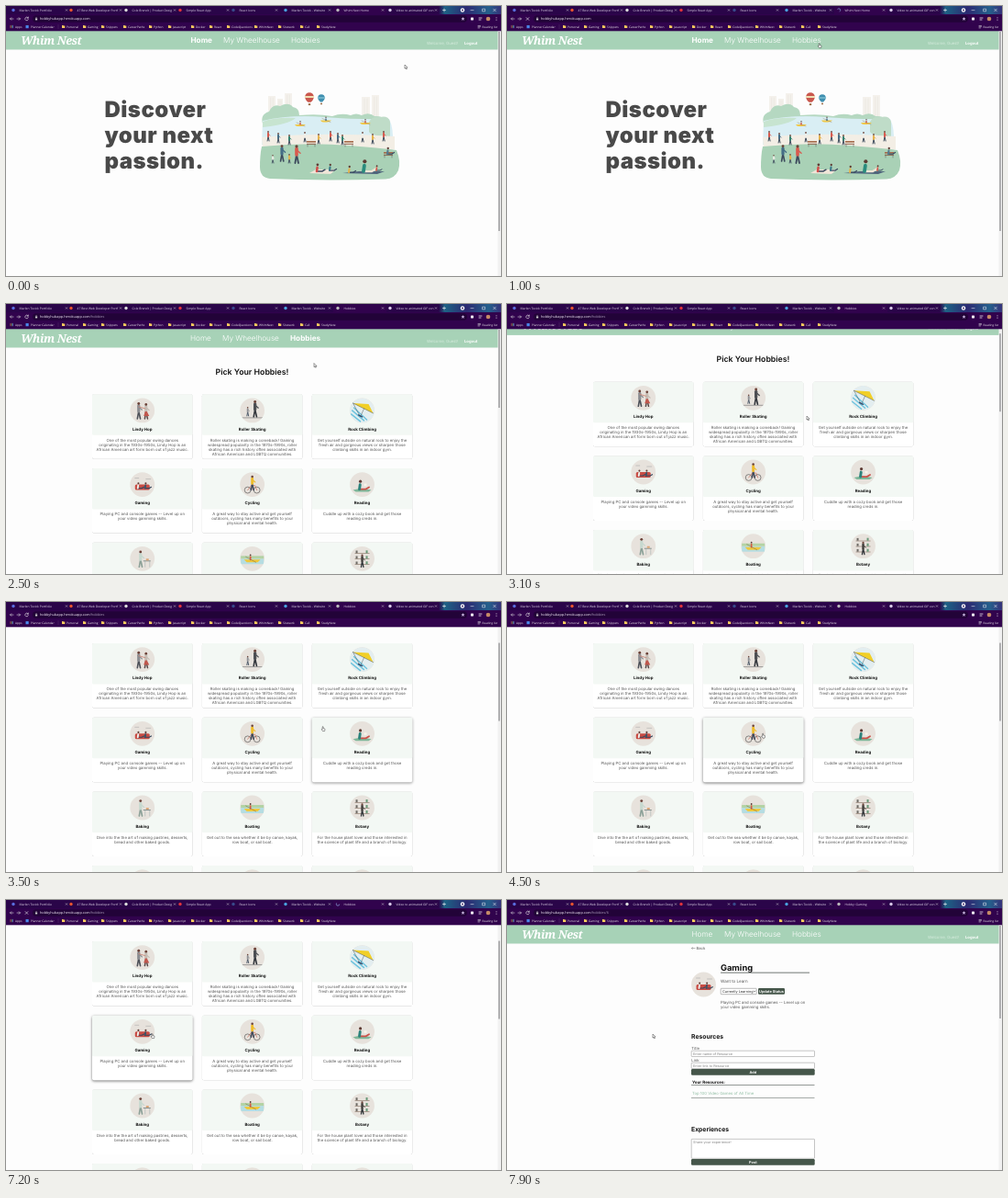
An HTML page for the animation above (8 s loop, 540 by 294 pixels).

```html
<!DOCTYPE html>
<html lang="en">
<head>
<meta charset="utf-8">
<title>Whim Nest</title>
<style>
html, body { margin: 0; width: 100%; height: 100%; overflow: hidden; background: #fdfdfd; }
svg { display: block; width: 540px; height: 294px; font-family: Inter, "Open Sans", sans-serif; text-rendering: geometricPrecision; }
.ui { font-family: "Open Sans", "Noto Sans", sans-serif; }
.logo { font-family: "Noto Serif", "Liberation Serif", serif; font-style: italic; }
.card { fill: #fff; filter: drop-shadow(0 .5px .6px rgba(0,0,0,.35)); }
.lift { fill: #fff; filter: drop-shadow(.5px 1.2px 1.4px rgba(0,0,0,.55)); }
</style>
</head>
<body>
<svg id="stage" viewBox="0 0 540 294"></svg>
<script>
const LOOP = 8000, STEP = 100;
const SHOW_HOBBIES = 1300, SHOW_DETAIL = 7500;
const INK = '#222', GREY = '#555', GREEN = '#a7d2b7', DARK = '#45564a';

// Drawing helpers
const text = (x, y, s, size, fill = INK, weight = 400, extra = '') =>
  `<text x="${x}" y="${y}" font-size="${size}" fill="${fill}" font-weight="${weight}" ${extra}>${s}</text>`;
const mid = (x, y, s, size, fill, weight) => text(x, y, s, size, fill, weight, 'text-anchor="middle"');
const rect = (x, y, w, h, fill, extra = '') =>
  `<rect x="${x}" y="${y}" width="${w}" height="${h}" fill="${fill}" ${extra}/>`;
const dot = (x, y, r, fill, extra = '') => `<circle cx="${x}" cy="${y}" r="${r}" fill="${fill}" ${extra}/>`;
const shape = (d, fill) => `<path d="${d}" fill="${fill}"/>`;
const line = (d, color, w = .5) =>
  `<path d="${d}" fill="none" stroke="${color}" stroke-width="${w}" stroke-linecap="round"/>`;
const group = (id, body, extra = '') => `<g id="${id}" ${extra}>${body}</g>`;

function person(x, y, h, top, legs = '#3c4a5c') {
  const hip = y - h * .45, neck = y - h * .78;
  return line(`M${x - h * .08} ${y}L${x} ${hip}L${x + h * .1} ${y}`, legs, h * .09) +
    line(`M${x} ${hip}V${neck}`, top, h * .18) +
    line(`M${x} ${neck + h * .06}l${h * .2} ${h * .18}`, top, h * .07) +
    dot(x, y - h * .91, h * .08, '#6b4238');
}

function sitter(x, y, s, top, legs = '#39495f') {
  return line(`M${x} ${y}h${s}l${s * .5} ${-s * .3}`, legs, s * .25) +
    line(`M${x} ${y}l${s * .1} ${-s * .7}`, top, s * .42) +
    dot(x + s * .15, y - s * 1.2, s * .23, '#5d3a33');
}

// Browser frame
const TABS = [
  [8, 'Marlen Tovick Portfolio', '#5b6ee0'], [71, '47 Best Web Developer Portf', '#e8542f'],
  [131, 'Cole Brendt | Product Desig', '#ddd'], [190, 'Simple React App', '#e0333c'],
  [248, 'React Icons', '#394a8c'], [305, 'Marlen Tovick - Website', '#4aa3e0'],
  [362, '', '#bbb'], [419, 'Video to animated GIF con', '#d8c8e8']
];
const CLOSE = [66, 125, 184, 242, 295, 353, 411, 469];
const MARKS = [
  [66, 'Personal'], [89, 'Gaming'], [109, 'Snippets'], [133, 'CareerPaths'], [161, 'Python'],
  [182, 'Javascript'], [207, 'Docker'], [227, 'React'], [246, 'CodeQuestions'],
  [276, 'WhimNest'], [302, 'Sitework'], [326, 'Call'], [344, 'StudyNote']
];
const cross = (x, y, r, c, w) => line(`M${x - r} ${y - r}l${2 * r} ${2 * r}m0 ${-2 * r}l${-2 * r} ${2 * r}`, c, w);

function browser() {
  let s = rect(0, 0, 540, 9.5, '#2a0549') + rect(0, 9, 540, 18.3, '#31034d') +
    rect(357, .8, 58, 9, '#31034d', 'rx="1.5"') + rect(472, 0, 68, 9, 'url(#sky)') +
    rect(29, 10.3, 474, 7.4, '#220338', 'rx="3.7"');
  TABS.forEach(([x, label, c], i) => {
    s += dot(x, 4.5, 1.7, c, i === 6 ? 'id="tabIcon"' : '') +
      text(x + 6.5, 5.7, label, 3.35, '#e4dcec', 400, i === 6 ? 'id="tabTitle"' : '') +
      cross(CLOSE[i], 4.5, .8, '#ddd', .45);
  });
  s += line('M478 3v3M476.5 4.5h3', '#fff', .6) + dot(498, 4.5, 2.2, '#fff') + dot(498, 4.5, 1, '#49336f') +
    line('M507 4.6h3M520 3.2h2.6v2.6h-2.6z', '#fff', .5) + cross(533, 4.5, 1.3, '#fff', .5);
  s += line('M8 14H4.5l1.3-1.3M4.5 14l1.3 1.3M12 14h3.5l-1.3-1.3M15.5 14l-1.3 1.3', '#ddd', .6) +
    group('reload', line('M24 12.8a1.8 1.8 0 1 0 .3 1.8M24.3 12v1.2h-1.2', '#eee', .6)) +
    group('stop', cross(22.5, 14, 1.4, '#eee', .6)) +
    rect(32, 13.6, 2.2, 1.8, '#ccc') + line('M32.5 13.5v-.6a.6.6 0 0 1 1.2 0v.6', '#ccc', .4) +
    text(37, 15.4, 'hobbyhubapp.herokuapp.com<tspan id="path" fill="#a99ab8"></tspan>', 3.85, '#f2ecf7');
  s += shape('M498.5 12l.6 1.3 1.4.1-1.1.9.4 1.4-1.3-.8-1.3.8.4-1.4-1.1-.9 1.4-.1z', '#c9b8e0') +
    rect(507, 12.6, 3, 2.8, '#fff', 'rx=".6"') + line('M516 13h3M516 15h2', '#fff', .7) +
    dot(526, 14, 2.3, '#c48a66') + [12.5, 14, 15.5].map(y => dot(535, y, .45, '#fff')).join('');
  for (let i = 0; i < 9; i++)
    s += rect(4.6 + i % 3 * 1.2, 20.9 + (i / 3 | 0) * 1.2, .8, .8, ['#e85', '#7c6', '#69e'][i % 3]);
  s += text(10, 23.7, 'Apps', 3.2, '#eee') + rect(21.5, 21, 3.2, 3.2, '#4a86e8') +
    text(27, 23.7, 'Planner Calendar', 3.2, '#eee') + line('M57 20.5v4', '#604078', .4);
  MARKS.forEach(([x, label]) => {
    s += shape(`M${x - 5} 21h1.4l.4.5h1.5v2.6h-3.3z`, '#f4c95d') + text(x, 23.7, label, 3.2, '#eee');
  });
  return s + line('M515 21.5h2.5M515 22.7h2.5M515 23.9h1.5', '#eee', .5) +
    text(519.5, 23.7, 'Reading list', 3.1, '#eee');
}

// Shared page header
function header(active) {
  const names = ['Home', 'My Wheelhouse', 'Hobbies'], at = active === 2 ? [201, 236, 310] : [201.5, 237, 311];
  return rect(0, 27, 537, 20.5, GREEN) +
    text(16, 42, 'Whim Nest', 12.6, '#fff', 700, 'class="logo" letter-spacing="-.4"') +
    names.map((n, i) => text(at[i], 40.3, n, 8.2, '#fff', i === active ? 700 : 300)).join('') +
    text(459, 42, 'Welcome, Guest!', 4.3, '#e6f5eb', 300) + text(500, 42, 'Logout', 4.2, '#fff', 700);
}

// Home page
function balloon(x, y, r, a, b) {
  return shape(`M${x - r} ${y}a${r} ${r} 0 0 1 ${2 * r} 0q0 ${r * .7} ${-r * .7} ${r * 1.2}h${-r * .6}q${-r * .7} ${-r * .5} ${-r * .7} ${-r * 1.2}`, a) +
    line(`M${x - r * .9} ${y}h${r * 1.8}`, b, r * .4) +
    rect(x - r * .25, y + r * 1.5, r * .5, r * .4, '#9a6a45');
}
function boat(x, y, c) {
  return shape(`M${x - 6} ${y}h12q-2 2-5 2h-4q-2 0-3-2`, '#f0c848') +
    line(`M${x - 4} ${y - 2}l9 4`, '#8d7656', .4) + line(`M${x} ${y}v-1.6`, c, 1.4) + dot(x, y - 3.2, .7, '#5a3b35');
}
function bench(x, y) {
  return rect(x - 5, y - 4, 10, 1.6, '#a56a4a') + rect(x - 5, y - 1.2, 10, .9, '#84503a') +
    line(`M${x - 4} ${y}v2M${x + 4} ${y}v2`, '#555', .5);
}
function park() {
  const tower = (x, y, w, h) => rect(x, y, w, h, '#f4f1ec') +
    line(`M${x + w / 3} ${y + 2}v${h - 2}M${x + w * 2 / 3} ${y + 2}v${h - 2}`, '#e6e1da', .5);
  let s = tower(286, 98, 8, 24) + tower(296, 101, 6, 20) + tower(304, 95, 8, 26) +
    tower(388, 99, 9, 24) + tower(399, 97, 8, 28) +
    shape('M280 128q-3-10 7-13q4-9 12-6q9-5 14 1q7 1 7 9q20-2 36 1q10-4 20-1q6-3 12 0q8-4 14 1q11-1 14 8v14H280z', '#b5d8c1') +
    shape('M280 125q30-7 68-4t70 2q5 10 4 28H279z', '#d9eef4') +
    shape('M280 126q14-5 36-4q-8 7-36 10z', '#c7e4d0') +
    shape('M396 126q5-7 12-5q9-2 11 5v16q-20 0-23-5z', '#bfdcc8') +
    shape('M279 143q70-6 145-1v14H280z', '#f3eee5') +
    shape('M279 153q50-5 96-1t51 5q5 12 2 22q-4 9-14 9.5q-70 2-126-.5q-11-1-11-13q0-13 2-22', '#a9d1b6') +
    balloon(331, 99, 4.8, '#c9574d', '#f0dfb4') + balloon(344, 100, 3.8, '#3f8fb0', '#7fbfd0') +
    boat(321, 129, '#d65a4a') + boat(349, 124.5, '#496b80') + boat(392, 127, '#c95b4c');
  [[333, 151], [374, 151], [417, 163]].forEach(p => s += bench(...p));
  const colors = ['#d95a4e', '#f0efe9', '#456d86', '#e5b34c', '#33806f'];
  [286, 297, 309, 326, 341, 354, 362, 367, 389, 400, 412].forEach((x, i) =>
    s += person(x, 147 + i * 7 % 5, 11, colors[i * 2 % 5]));
  [[291, 171, 9, 1], [301, 169, 18, 2], [309, 171, 10, 3], [317, 171, 20, 0]].forEach(([x, y, h, c]) =>
    s += person(x, y, h, colors[c]));
  s += shape('M331 182l7-4h22l-6 5z', '#f0e5d8') + sitter(339, 180, 6, '#d14e4b') + sitter(353, 179, 5, '#397a8a') +
    shape('M367 182l18-2h28l-8 3z', '#4f657c') + sitter(374, 181, 5, '#e2b44f') + sitter(390, 180, 9, '#298b7d', '#efe6d5') +
    sitter(404, 179, 4, '#d95a4e') + sitter(416, 161, 5, '#537a8e');
  return s;
}
function home() {
  return header(0) + ['Discover', 'your next', 'passion.'].map((w, i) =>
    text(107.5, 121.3 + i * 28, w, 24, '#494949', 900, 'letter-spacing=".45"')).join('') + park();
}

// Hobby pictures, drawn around 0,0 inside a disc
const ART = {
  'Lindy Hop': () => person(-4, 9, 18, '#8a8c90', '#4c5058') + person(4, 9, 17, '#c4bcb4', '#5a4a4a') +
    shape('M3 1h2l2.5 5h-6z', '#c0564c') + line('M-4-4l7 2', '#c9887a', .9),
  'Roller Skating': () => person(3, 7, 18, '#4b4d52', '#33363c') + person(-5, 6, 10, '#8d8f93') + line('M-11 8h22', '#888', .8),
  'Rock Climbing': () => dot(0, 0, 13.4, '#e3eef0') + line('M-12 4L-2 12M-11 0L2 11M-9-3L5 10', '#6ec3dd', 1.4) +
    shape('M-10-8L7-7L12 3L2-2z', '#f1cf28') + line('M-10-8L12 3M-10-8L-2 7L2-2', '#4a5458', .5) + line('M-4 5l4 2', '#2f4d70', 1.4),
  'Gaming': () => rect(-8, 0, 16, 6, '#c84b43', 'rx="1.5"') + sitter(-5, 4, 4.5, '#f0eee9') + sitter(3, 4, 4.5, '#3f5264') + line('M-8-7h4M4-6h5', '#aaa', .6),
  'Cycling': () => dot(-5, 6, 3.4, 'none', 'stroke="#444" stroke-width=".6"') + dot(5, 6, 3.4, 'none', 'stroke="#444" stroke-width=".6"') +
    line('M-5 6l4-5h4l2 5M-1 1l2 5', '#c45a45', .6) + person(0, 6, 16, '#efbd2c'),
  'Reading': () => shape('M-10 6q9-3 20 0l-3 2h-14z', '#7fb79a') + sitter(-3, 5, 7, '#2c827b', '#ca5249') + rect(2, -1, 3, 2.5, '#f7f4ea'),
  'Baking': () => person(-2, 9, 18, '#c7d8cf', '#8ba097') + rect(1, 2, 8, 1, '#87918e') + line('M3 3v6M8 3v6', '#9aa', .5) + rect(4, 0, 3, 2, '#d9a678'),
  'Boating': () => rect(-12.5, 0, 25, 6, '#b5dde2') + rect(-12.5, -3, 25, 3, '#b3d3a4') + shape('M-9 1h18l-3 3h-12z', '#efc83b') +
    line('M-2 1v-3', '#d85b45', 1.7) + dot(-2, -4, .9, '#5a3b35') + line('M-7-2l11 6', '#77634c', .5),
  'Botany': () => [-6, 0, 6].map(y => rect(-8, y, 16, .6, '#826c5c') + rect(-7, y - 2.8, 2, 2.8, '#6d6a64') + rect(4, y - 3, 2, 3, '#689978')).join('') +
    person(0, 9, 14, '#45423f', '#292e33'),
};
const picture = (name, x, y) =>
  `<g transform="translate(${x} ${y})">${dot(0, 0, 13.4, '#e7e2dc')}<g clip-path="url(#disc)">${ART[name] ? ART[name]() : ''}</g></g>`;

const HOBBIES = [
  ['Lindy Hop', 'One of the most popular swing dances|originating in the 1930s-1950s, Lindy Hop is an|African American art form born out of jazz music.'],
  ['Roller Skating', 'Roller skating is making a comeback! Gaining|widespread popularity in the 1970s-1990s, roller|skating has a rich history often associated with|African American and LGBTQ communities.'],
  ['Rock Climbing', 'Get yourself outside on natural rock to enjoy the|fresh air and gorgeous views or sharpen those|climbing skills in an indoor gym.'],
  ['Gaming', 'Playing PC and console games -- Level up on|your video gamming skills.'],
  ['Cycling', 'A great way to stay active and get yourself|outdoors, cycling has many benefits to your|physical and mental health.'],
  ['Reading', 'Cuddle up with a cozy book and get those|reading creds in.'],
  ['Baking', 'Dive into the the art of making pastries, desserts,|bread and other baked goods.'],
  ['Boating', 'Get out to the sea whether it be by canoe, kayak,|row boat, or sail boat.'],
  ['Botany', 'For the house plant lover and those interested in|the science of plant life and a branch of biology.'],
  ['', ''], ['', ''], ['', '']
];
const CARD_W = 109.5, CARD_H = 70.5;
const cardX = i => 94 + i % 3 * 119.9;
const cardY = i => 98.3 + (i / 3 | 0) * 80.7;

function hobbies() {
  return header(2) + mid(268.5, 77, 'Pick Your Hobbies!', 8.75, '#111', 600) + HOBBIES.map(([name, about], i) => {
    const x = cardX(i), y = cardY(i), c = x + CARD_W / 2, box = `x="${x}" y="${y}" width="${CARD_W}" height="${CARD_H}" rx="2"`;
    return `<rect class="lift" id="lift${i}" ${box}/><rect class="card" ${box}/>` +
      rect(x, y, CARD_W, 44.5, '#f3f8f4', 'rx="1.5"') + group('pic' + i, picture(name, c, y + 17.6)) +
      mid(c, y + 39.3, name, 4.4, '#111', 700) +
      about.split('|').map((s, n) => mid(c, y + 51.2 + n * 5.1, s, 4.3, GREY)).join('');
  }).join('');
}

// Detail page
function detail() {
  const field = (y, h, hint) => rect(201.2, y, 134.3, h, '#fff', 'stroke="#8a8a8a" stroke-width=".5" rx=".6"') +
    text(203, y + 4.6, hint, 3.8, '#858585');
  const button = (x, y, w, label) => rect(x, y, w, 6.8, DARK, 'rx="1.2"') + mid(x + w / 2, y + 4.8, label, 3.9, '#fff', 700);
  return header(-1) + line('M205 52.5h-3.5l1-1M201.5 52.5l1 1', GREY, .4) + text(206.5, 54, 'Back', 4.2, GREY) +
    text(233, 76.8, 'Gaming', 9.3, '#111', 700) + rect(233, 78.7, 97, .8, '#4c5550') + picture('Gaming', 214.5, 92) +
    text(233, 90, 'Want to Learn', 4.5, GREY) +
    rect(233.2, 96.3, 39, 6.4, '#fff', 'stroke="#777" stroke-width=".5" rx=".6"') +
    text(235, 100.9, 'Currently Learning', 3.8, INK) + line('M269.2 99l.9.9.9-.9', INK, .5) + button(274, 96, 29, 'Update Status') +
    text(233, 112.6, 'Playing PC and console games -- Level up on', 4.3, GREY) + text(233, 117.7, 'your video gamming skills.', 4.3, GREY) +
    text(201, 150.9, 'Resources', 6.8, '#111', 700) + text(201.3, 162.5, 'Title', 4.2, GREY) + field(164.2, 6.3, 'Enter name of Resource') +
    text(201.3, 175.6, 'Link', 4.2, GREY) + field(177.2, 6.3, 'Enter link to Resource') + button(201, 184, 134.7, 'Add') +
    text(202, 200.4, 'Your Resources:', 4.5, '#111', 700) + rect(201, 201.3, 134.5, .6, '#4c5550') +
    text(202, 212, 'Top 100 Video Games of All Time', 4.3, '#8dbba0') + rect(201, 215.2, 134.5, .6, '#6b746f') +
    text(201, 252, 'Experiences', 6.8, '#111', 700) + field(260.3, 21, 'Share your experience!') + button(201, 282, 134.7, 'Post');
}

// Motion
const POINTER = [
  [0, 436, 66], [300, 425, 62], [900, 341, 43], [2300, 341, 43], [2700, 333, 90], [3100, 328, 124],
  [3500, 346, 138], [3900, 366, 150], [4300, 303, 156], [4700, 256, 135], [5100, 200, 108],
  [5500, 164, 100], [5900, 160, 98], [6600, 160, 146], [6900, 160, 148], [8000, 160, 148]
];
const SCROLL = [[0, 0], [2900, 0], [3000, 4], [3100, 13.6], [3200, 29], [3300, 42], [3400, 50], [3500, 53.3], [8000, 53.3]];

function along(table, t) {
  t = Math.max(0, t);
  const i = Math.max(1, table.findIndex(r => r[0] >= t)), a = table[i - 1], b = table[i];
  const k = (t - a[0]) / (b[0] - a[0]);
  return a.slice(1).map((v, n) => v + (b[n + 1] - v) * k);
}
function over(i, t) {
  const [x, y] = along(POINTER, t), [sc] = along(SCROLL, t), dx = x - cardX(i), dy = y + sc - cardY(i);
  return t >= SHOW_HOBBIES && dx > 0 && dx < CARD_W && dy > 0 && dy < CARD_H;
}

document.getElementById('stage').innerHTML =
  `<defs><clipPath id="disc"><circle r="13.4"/></clipPath>
   <linearGradient id="sky"><stop offset="0" stop-color="#2a0549"/><stop offset=".1" stop-color="#1d6285"/>
   <stop offset=".45" stop-color="#2c2a72"/><stop offset=".8" stop-color="#25608c"/><stop offset="1" stop-color="#35327a"/></linearGradient></defs>` +
  rect(0, 0, 540, 294, '#fdfdfd') + group('home', home()) + group('hobbies', hobbies()) + group('detail', detail()) +
  rect(536.5, 27, 3.5, 267, '#f1f1f1') + rect(537, 28, 2, 80, '#b0b0b2', 'id="thumb"') +
  group('chrome', browser(), 'class="ui"') +
  group('pointer', group('arrow', `<path d="M-1-2v4.2l1-.9.7 1.5.7-.3-.7-1.5h1.3z" fill="#fff" stroke="#222" stroke-width=".45"/>`) +
    group('hand', `<path d="M-.8-2.2q.6-.5.9 0v1.7l1.7.5q.4.9-.2 2.6h-2.1l-1.4-1.9q.3-.6 1.1 0z" fill="#fff" stroke="#222" stroke-width=".45"/>`));

const $ = id => document.getElementById(id);
const show = (id, on) => { $(id).style.display = on ? '' : 'none'; };

function draw(t) {
  const page = t < SHOW_HOBBIES ? 0 : t < SHOW_DETAIL ? 1 : 2;
  const [x, y] = along(POINTER, t), [sc] = along(SCROLL, t);
  const loading = (t >= 1000 && t < 2400) || (t >= 7000 && t < 7800);
  ['home', 'hobbies', 'detail'].forEach((id, i) => show(id, i === page));
  $('hobbies').setAttribute('transform', `translate(0 ${-sc})`);
  let hot = page === 0 && x < 345 && y < 47 || page === 1 && t < 2400;
  HOBBIES.forEach((_, i) => {
    show('pic' + i, t >= 1400 + i * 100);
    let sum = 0;
    for (let k = 0; k < 4; k++) sum += over(i, t - k * 60);
    $('lift' + i).style.opacity = sum / 4;
    hot = hot || page === 1 && over(i, t);
  });
  show('stop', loading);
  show('reload', !loading);
  $('tabIcon').setAttribute('style', loading
    ? `fill:none;stroke:#9cc3f5;stroke-width:.6;stroke-dasharray:7 4;stroke-dashoffset:${-t / 60}` : '');
  $('tabTitle').textContent = ['Whim Nest Home', 'Hobbies', 'Hobby: Gaming'][page];
  $('path').textContent = ['', '/hobbies', '/hobbies/6'][page];
  $('thumb').setAttribute('y', 28 + (page === 1 ? sc * .31 : 0));
  $('thumb').setAttribute('height', [217, 85, 101][page]);
  $('pointer').setAttribute('transform', `translate(${x} ${y})`);
  show('hand', hot);
  show('arrow', !hot);
}

const start = performance.now();
function tick() {
  const t = (performance.now() - start) % LOOP;
  draw(Math.floor(t / STEP) * STEP);
  requestAnimationFrame(tick);
}
tick();
</script>
</body>
</html>
```
